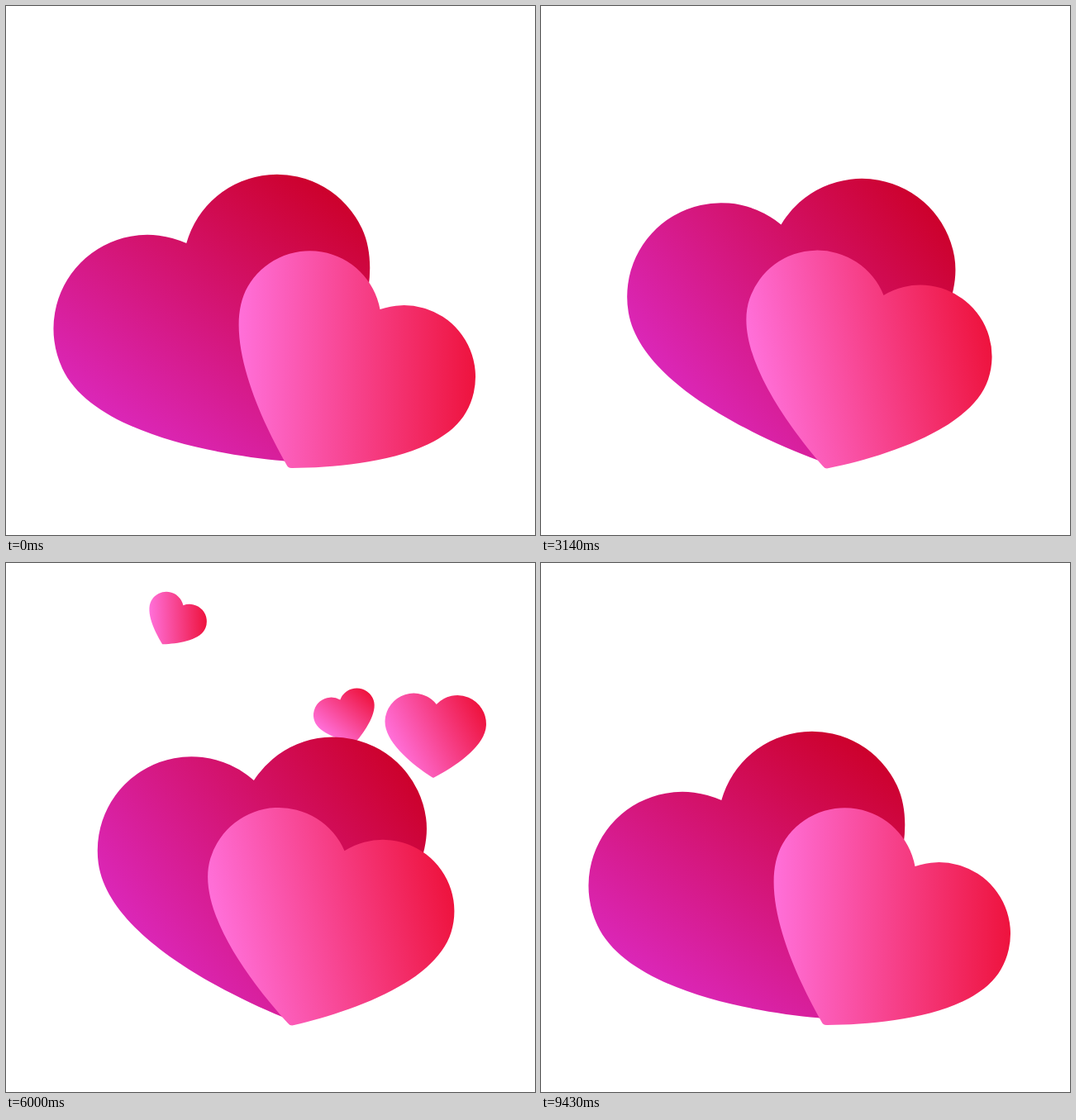
Animation of 640x640 px, one loop 9500 ms. Source, as an HTML page:

```html
<!DOCTYPE html>
<html lang="en">
<head>
<meta charset="utf-8">
<title>Hearts</title>
<style>
  html, body { margin: 0; width: 100%; height: 100%; overflow: hidden; background: #fff; }
  svg { display: block; width: 100%; height: 100%; }
</style>
</head>
<body>
<svg viewBox="0 0 640 640">
  <defs>
    <linearGradient id="pink" gradientUnits="userSpaceOnUse" x1="-122" y1="70" x2="127" y2="-73">
      <stop offset="0" stop-color="#ff6fd8"/>
      <stop offset="1" stop-color="#ee123c"/>
    </linearGradient>
    <linearGradient id="crimson" gradientUnits="userSpaceOnUse" x1="-126" y1="73" x2="131" y2="-76">
      <stop offset="0" stop-color="#db27b9"/>
      <stop offset="1" stop-color="#cc0028"/>
    </linearGradient>
    <path id="heart" d="M0-56.1A86.5 86.5 0 0 1 152.35 0C152.35 64 62 129.3 4 163.2Q0 166.2-4 163.2C-62 129.3-152.35 64-152.35 0A86.5 86.5 0 0 1 0-56.1Z"/>
  </defs>
  <g id="floaters" fill="url(#pink)"></g>
  <use id="back" href="#heart" fill="url(#crimson)"/>
  <use id="front" href="#heart" fill="url(#pink)"/>
</svg>
<script>
const LOOP = 9.5, GROW = .5;
const back = document.getElementById('back');
const front = document.getElementById('front');
const group = document.getElementById('floaters');

// Each heart follows one Bezier curve through x, y, scale and angle.
const floaters = [
  { start: 3.5, end: 9.1, fade: 1.49, curve: [
    [470, 380, .373, 15.8], [563, 238, .636, 15.6], [494.5, 71, .194, -17.3], [508.7, 90, .153, -8]] },
  { start: 5, end: 8.54, fade: .84, curve: [
    [480, 281, .307, -29.6], [405, 145, .231, -15.4], [278, 63, .181, -9.8], [321.5, 35, .157, -12.6]] },
  { start: 3.5, end: 7.03, fade: .77, curve: [
    [190.5, 310.5, .669, -8], [198.7, 45.7, .267, 34.9], [218.7, 35.7, .147, 28.7]] }
];

for (const f of floaters) {
  f.el = document.createElementNS('http://www.w3.org/2000/svg', 'use');
  f.el.setAttribute('href', '#heart');
  group.append(f.el);
}

// cubic-bezier(.42, 0, .58, 1), solved by bisection
function easeInOut(x) {
  let lo = 0, hi = 1, u = .5;
  for (let i = 0; i < 24; i++) {
    u = (lo + hi) / 2;
    const v = 1 - u;
    if (1.26 * u * v * v + 1.74 * u * u * v + u ** 3 < x) lo = u; else hi = u;
  }
  return u * u * (3 - 2 * u);
}

const mix = (p, q, u) => p.map((v, i) => v + (q[i] - v) * u);

// de Casteljau, any degree
function bezier(points, u) {
  while (points.length > 1) {
    points = points.slice(1).map((q, i) => mix(points[i], q, u));
  }
  return points[0];
}

function swing(el, x, y, angle, height, scale) {
  el.setAttribute('transform',
    `translate(${x} ${y}) rotate(${angle}) translate(0 ${-height}) scale(${scale})`);
}

function float({ el, start, end, fade, curve }, t) {
  const shown = t > start && t < end;
  el.setAttribute('visibility', shown ? 'visible' : 'hidden');
  if (!shown) return;
  const [x, y, s, a] = bezier(curve, (t - start) / (end - start));
  swing(el, x, y, a, 0, s * Math.min(1, (t - start) / GROW));
  el.setAttribute('opacity', Math.min(1, (end - t) / fade));
}

function draw(now) {
  const t = now / 1000 % LOOP;
  const p = easeInOut(1 - Math.abs(1 - t / (LOOP / 2)));
  swing(back, 339, 546, -25 + 20 * p, 212, 1.313);
  swing(front, 347.7, 548.6, 30 - 15 * p, 153.5, 1);
  for (const f of floaters) float(f, t);
}

function tick() {
  draw(performance.now());
  requestAnimationFrame(tick);
}
tick();
</script>
</body>
</html>
```
